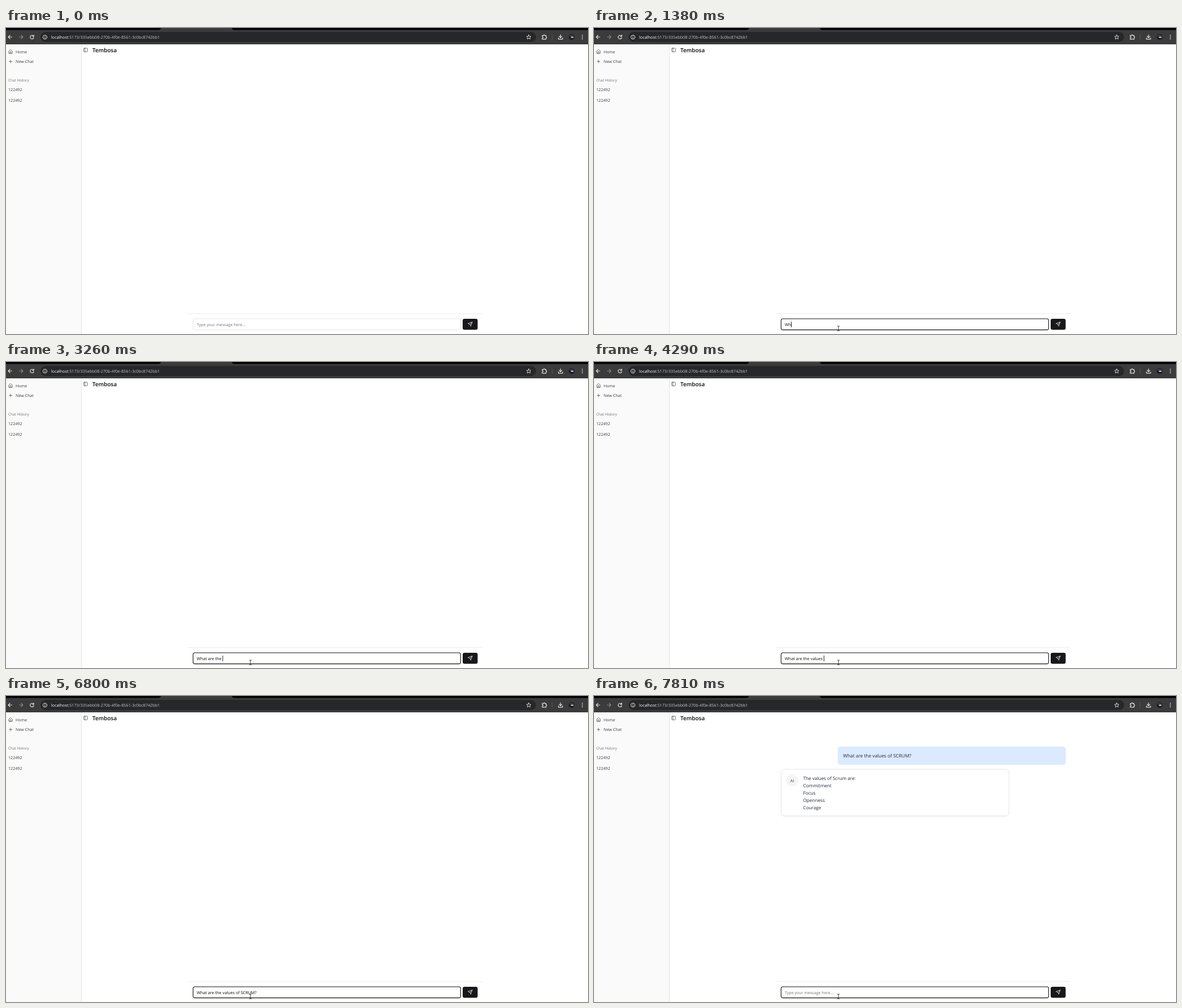
These frames come from a looping animation (1031 by 543 pixels, 8000 ms). An HTML page:

```html
<!DOCTYPE html>
<html lang="en">
<head>
<meta charset="utf-8">
<title>Chat</title>
<style>
  html, body { margin: 0; width: 100%; height: 100%; overflow: hidden; background: #fff; }
  svg { display: block; width: 100%; height: 100%; }
  text { font: 7.15px "Open Sans", "Noto Sans", sans-serif; white-space: pre; text-rendering: geometricPrecision; fill: #3f3f46; }
  .url { font-size: 7.27px; fill: #c3c5c9; }
  .url tspan { fill: #fff; }
  .group { font-size: 6.4px; fill: #6d6d73; }
  .title { font-size: 10px; font-weight: 600; fill: #0a0a0a; }
  .hint { font-size: 7.08px; fill: #737378; }
  .typed { font-size: 7.28px; fill: #0a0a0a; }
  .ask { font-size: 8.31px; fill: #1f2937; }
  .answer text { font-size: 8.17px; fill: #1f2937; }
  .answer .badge { font-size: 7.2px; font-weight: 500; fill: #3f3f46; text-anchor: middle; }
  .icon { fill: none; stroke-linecap: round; stroke-linejoin: round; }
  .bar { stroke: #e3e3e3; stroke-width: 1.2; }
  .lucide { stroke: #3f3f46; stroke-width: 2; }
  .hide { visibility: hidden; }
</style>
</head>
<body>
<svg viewBox="0 0 1031 543">
  <rect width="1031" height="543" fill="#fff"/>

  <!-- browser bar -->
  <rect width="1031" height="29" fill="#3b3b3c"/>
  <path d="M0 0H274.500Q273.500 3.600 270 3.600H0ZM400 0H1031V3.600H404.500Q401 3.600 400 0Z" fill="#000"/>
  <rect x="61" y="7" width="878" height="18" rx="9" fill="#262729"/>
  <g class="icon bar">
    <path d="M10.500 16H4.200M7 13L4 16L7 19"/>
    <path d="M23.500 16H29.500M27 13L30 16L27 19" stroke="#858587"/>
    <path d="M48.600 14.200A3.200 3.200 0 1 0 49.200 17M49.200 12.600V14.800H47"/>
    <circle cx="69" cy="16.200" r="3.600" stroke-width="1"/>
    <path d="M69 16V18M69 14.300V14.400" stroke-width="1"/>
    <path d="M926 12.200L927.100 14.800L929.900 15L927.800 16.900L928.500 19.700L926 18.200L923.500 19.700L924.200 16.900L922.100 15L924.900 14.800Z" stroke-width=".9"/>
    <path d="M950 13.300H952.200A1.200 1.200 0 0 1 954.600 13.300H956.600V15.400A1.200 1.200 0 0 1 956.600 17.800V19.900H950V17.900A1.300 1.300 0 0 0 950 15.300Z"/>
    <path d="M967.500 12V20" stroke="#626264" stroke-width=".8"/>
    <path d="M982.300 12V17M979.900 14.900L982.300 17.200L984.700 14.900M978.600 17.500V19.800H986V17.500"/>
  </g>
  <circle cx="1002" cy="16" r="5" fill="#17191f"/>
  <path d="M997.500 14.500Q1002 10.500 1006.300 14.200Q1002 13.600 997.500 14.500Z" fill="#565c69"/>
  <ellipse cx="1003" cy="16.400" rx="2.800" ry="1.100" fill="#d8dadf"/>
  <g fill="#e3e3e3">
    <circle cx="1021" cy="12.800" r=".9"/><circle cx="1021" cy="16" r=".9"/><circle cx="1021" cy="19.200" r=".9"/>
  </g>
  <text class="url" x="80" y="18.800"><tspan>localhost</tspan>:5173/335ebb08-270b-4f0e-8561-3c0bc8742bb1</text>

  <!-- sidebar -->
  <rect y="29" width="133.500" height="514" fill="#fafafa"/>
  <rect x="133" y="29" width=".8" height="514" fill="#e2e2e5"/>
  <g class="icon lucide">
    <path transform="translate(3.700 37.700) scale(.361)" d="M15 21v-8a1 1 0 0 0-1-1h-4a1 1 0 0 0-1 1v8M3 10a2 2 0 0 1 .7-1.500l7-6a2 2 0 0 1 2.600 0l7 6A2 2 0 0 1 21 10v9a2 2 0 0 1-2 2H5a2 2 0 0 1-2-2z"/>
    <path transform="translate(3.700 55.100) scale(.361)" d="M5 12h14M12 5v14"/>
    <path transform="translate(136.700 34.700) scale(.361)" d="M5 3h14a2 2 0 0 1 2 2v14a2 2 0 0 1-2 2H5a2 2 0 0 1-2-2V5a2 2 0 0 1 2-2zM9 3v18"/>
  </g>
  <text x="17" y="44.900">Home</text>
  <text x="17" y="62.200">New Chat</text>
  <text class="group" x="4" y="94.500">Chat History</text>
  <text x="4" y="111.800">122492</text>
  <text x="4" y="131.200">122492</text>
  <text class="title" x="153" y="43.300">Tembosa</text>

  <!-- conversation -->
  <g id="ask">
    <rect x="431.700" y="89.800" width="404" height="32.200" rx="5.400" fill="#dbeafe"/>
    <text class="ask" x="441.300" y="108.500">What are the values of SCRUM?</text>
  </g>
  <g id="answer" class="answer">
    <rect x="331.500" y="130.700" width="403.500" height="83" rx="5.400" fill="#ececee"/>
    <rect x="331.500" y="130.200" width="403.500" height="82.600" rx="5.400" fill="#fff" stroke="#e0e0e3" stroke-width=".8"/>
    <circle cx="351" cy="149.800" r="10.700" fill="#f4f4f5"/>
    <text class="badge" x="351" y="152.500">AI</text>
  </g>

  <!-- message field -->
  <rect x="323" y="506.500" width="521" height=".7" fill="#e2e2e5"/>
  <rect id="field" x="331.400" y="516" width="474" height="19.600" rx="3.200" fill="#fff"/>
  <text id="hint" class="hint" x="338" y="528.800">Type your message here...</text>
  <text id="typed" class="typed" x="338" y="528.800"></text>
  <rect id="caret" y="521" width=".9" height="10" fill="#0a0a0a"/>
  <rect x="809" y="516" width="26.500" height="19.500" rx="3.200" fill="#18181b"/>
  <path class="icon" transform="translate(817.900 521.300) scale(.361)" stroke="#fff" stroke-width="2" d="m22 2-7 20-4-9-9-4ZM22 2 11 13"/>
  <path id="pointer" class="icon" stroke="#1c1c1c" stroke-width=".9" d="M-1.700-4Q0-4 0-3.200Q0-4 1.700-4M0-3.200V3.700M-1.700 4.500Q0 4.500 0 3.700Q0 4.500 1.700 4.500"/>
</svg>
<script>
const LOOP = 8000;
const FOCUS = 990, SEND = 7140, REPLY = 7480;
const $ = id => document.getElementById(id);

// time of each keystroke, text in the field
const keys = [
  [0, ""], [1190, "W"], [1380, "Wh"], [1450, "Wha"], [1520, "What"], [1650, "What "],
  [1720, "What a"], [1780, "What ar"], [1850, "What are"], [1980, "What are "],
  [2250, "What are h"], [2320, "What are he"], [2660, "What are h"], [2730, "What are "],
  [2860, "What are t"], [2930, "What are th"], [3130, "What are the"], [3260, "What are the "],
  [3680, "What are the v"], [3750, "What are the va"], [3880, "What are the val"],
  [4080, "What are the valu"], [4150, "What are the value"], [4220, "What are the values"],
  [4290, "What are the values "], [4420, "What are the values o"],
  [4480, "What are the values of"], [4550, "What are the values of "],
  [5150, "What are the values of S"], [5280, "What are the values of SC"],
  [5480, "What are the values of SCR"], [5610, "What are the values of SCRU"],
  [5810, "What are the values of SCRUM"], [6210, "What are the values of SCRUM?"],
  [SEND, ""]
];
const blinks = [[0, false], [FOCUS, true], [5080, false], [5150, true], [6800, false], [7330, true], [7810, false]];
const moves = [[460, 449, 540], [520, 444, 538], [590, 440, 536], [660, 437, 534], [720, 435, 533.5], [1260, 433, 533]];

const at = (list, t) => list.findLast(step => step[0] <= t);
const show = (id, on) => $(id).classList.toggle("hide", !on);

["The values of Scrum are:", "Commitment", "Focus", "Openness", "Courage"].forEach((line, i) => {
  const el = document.createElementNS("http://www.w3.org/2000/svg", "text");
  el.setAttribute("x", 370.5);
  el.setAttribute("y", 148.6 + 13 * i);
  el.textContent = line;
  $("answer").append(el);
});

function draw(t) {
  const text = at(keys, t)[1];
  const typed = $("typed");
  if (typed.textContent !== text) typed.textContent = text;
  show("hint", !text);
  show("caret", at(blinks, t)[1]);
  $("caret").setAttribute("x", 338 + (text ? typed.getComputedTextLength() : 0));

  const focused = t >= FOCUS;
  $("field").setAttribute("stroke", focused ? "#111114" : "#dedee2");
  $("field").setAttribute("stroke-width", focused ? 1.1 : 0.7);

  const move = at(moves, t);
  show("pointer", move);
  if (move) $("pointer").setAttribute("transform", `translate(${move[1]} ${move[2]})`);

  show("ask", t >= SEND);
  show("answer", t >= REPLY);
}

const start = performance.now();
function tick() {
  draw((performance.now() - start) % LOOP);
  requestAnimationFrame(tick);
}
tick();
</script>
</body>
</html>
```
